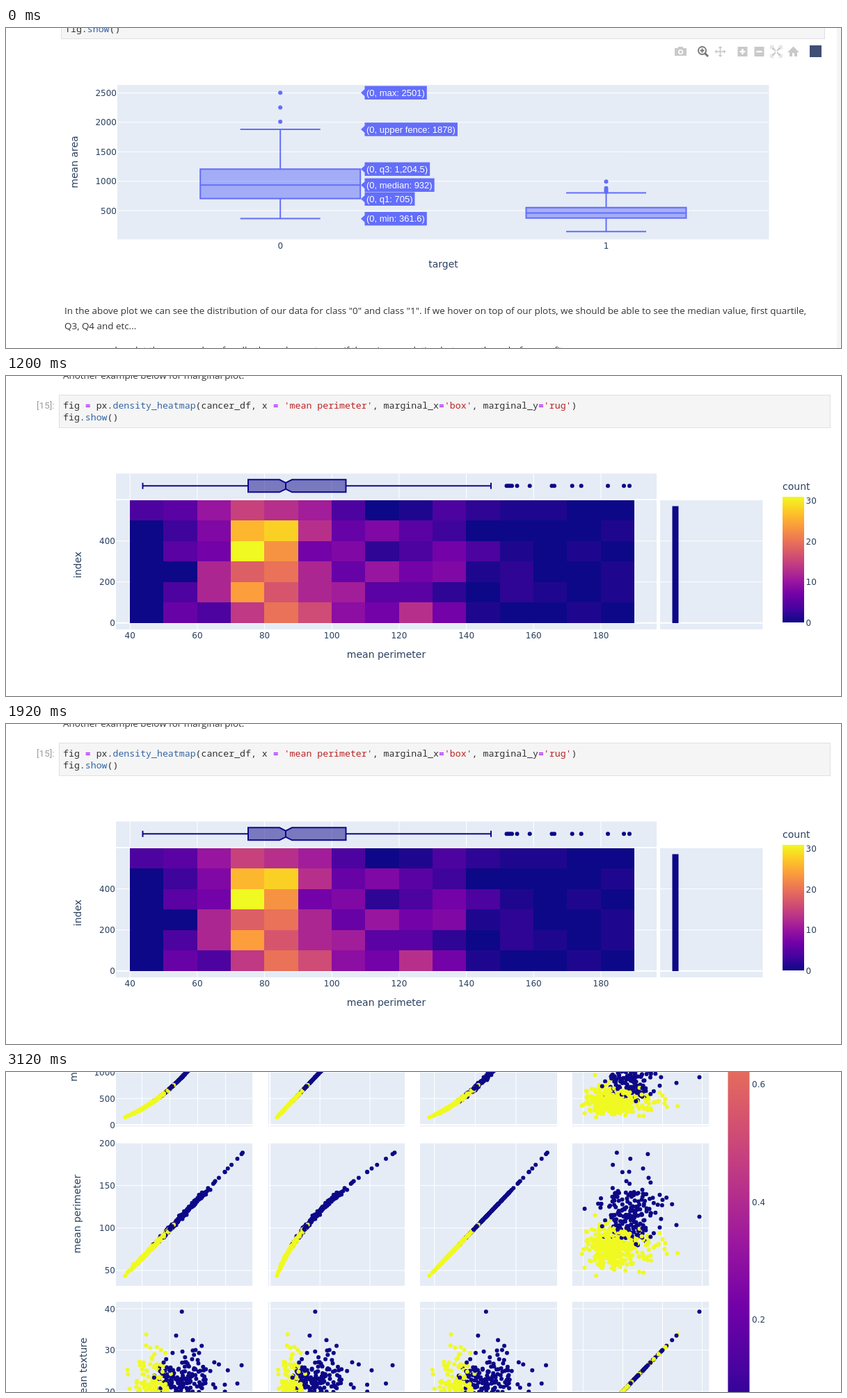
An HTML page with a canvas for the animation above (3600 ms loop, 1200 by 461 pixels).

```html
<!DOCTYPE html>
<html lang="en">
<head>
<meta charset="utf-8">
<title>Notebook charts</title>
<style>
html, body { margin: 0; width: 100%; height: 100%; overflow: hidden; background: #fff; }
canvas { display: block; }
</style>
</head>
<body>
<canvas id="stage" width="1200" height="461"></canvas>
<script>
const ctx = document.getElementById('stage').getContext('2d');
const W = 1200, H = 461, HOLD = 1200;

const INK = '#2a3f5f', PANEL = '#e5ecf6', BLUE = '#636efa', NAVY = '#0d0887', YELLOW = '#f0f921';
const PLASMA = ['#0d0887', '#46039f', '#7201a8', '#9c179e', '#bd3786',
                '#d8576b', '#ed7953', '#fb9f3a', '#fdca26', '#f0f921'];
const TICK = '12px "DejaVu Sans", sans-serif';
const TITLE = '14px "DejaVu Sans", sans-serif';
const HOVER = '13px "Liberation Sans", sans-serif';
const PROSE = '13.43px "Open Sans", sans-serif';
const MONO = '13.24px "Noto Sans Mono", monospace';

// Drawing helpers
function rect(x0, y0, x1, y1, fill) {
  ctx.fillStyle = fill;
  ctx.fillRect(x0, y0, x1 - x0, y1 - y0);
}

function line(x0, y0, x1, y1, color, width = 1) {
  ctx.strokeStyle = color;
  ctx.lineWidth = width;
  ctx.beginPath();
  ctx.moveTo(x0, y0);
  ctx.lineTo(x1, y1);
  ctx.stroke();
}

function dot(x, y, color, r = 3) {
  ctx.fillStyle = color;
  ctx.beginPath();
  ctx.arc(x, y, r, 0, Math.PI * 2);
  ctx.fill();
}

function shape(points, fill) {
  ctx.beginPath();
  points.forEach(([x, y]) => ctx.lineTo(x, y));
  ctx.closePath();
  ctx.fillStyle = fill;
  ctx.fill();
}

function text(str, x, y, font, color = INK, align = 'left') {
  ctx.font = font;
  ctx.fillStyle = color;
  ctx.textAlign = align;
  ctx.fillText(str, x, y);
}

function sideTitle(str, x, y) {
  ctx.save();
  ctx.translate(x, y);
  ctx.rotate(-Math.PI / 2);
  text(str, 0, 0, TITLE, INK, 'center');
  ctx.restore();
}

function code(tokens, x, y) {
  for (const [str, color, bold] of tokens) {
    text(str, x, y, (bold ? 'bold ' : '') + MONO, color);
    x += ctx.measureText(str).width;
  }
}

function cell(x0, y0, x1, y1) {
  rect(x0, y0, x1, y1, '#f5f5f5');
  ctx.strokeStyle = '#e0e0e0';
  ctx.lineWidth = 1;
  ctx.strokeRect(x0 + .5, y0 + .5, x1 - x0 - 1, y1 - y0 - 1);
}

function plasma(t) {
  const p = Math.max(0, Math.min(1, t)) * 9, i = Math.min(8, Math.floor(p));
  const part = (hex, k) => parseInt(hex.substr(1 + 2 * k, 2), 16);
  const mix = k => Math.round(part(PLASMA[i], k) + (part(PLASMA[i + 1], k) - part(PLASMA[i], k)) * (p - i));
  return `rgb(${mix(0)},${mix(1)},${mix(2)})`;
}

function colorBar(x0, x1, top, bottom) {
  const g = ctx.createLinearGradient(0, bottom, 0, top);
  PLASMA.forEach((c, i) => g.addColorStop(i / 9, c));
  rect(x0, top, x1, bottom, g);
}

const CODE = '#303030', CALL = '#3465a4', OP = '#aa22ff', STR = '#ba2121';
const SHOW = [['fig.', CODE], ['show', CALL], ['()', CODE]];

// Scene 1: box plot with hover labels
function modeBar() {
  const pale = '#c9c9c9', dark = '#777', y = 34;
  rect(961, 29, 978, 40, pale);
  rect(966, 27, 973, 30, pale);
  dot(969.5, 34.5, '#fff', 3.6);
  dot(969.5, 34.5, pale, 2);

  line(1004, 36, 1009, 41, dark, 3);
  dot(1000.5, 32.5, dark, 6.5);
  dot(1000.5, 32.5, '#fff', 4.6);
  line(997.5, 32.5, 1003.5, 32.5, dark, 2);
  line(1000.5, 29.5, 1000.5, 35.5, dark, 2);

  line(1019, y, 1034, y, pale, 1.6);
  line(1026.5, 27, 1026.5, 41, pale, 1.6);
  for (let k = 0; k < 4; k++) {
    ctx.save();
    ctx.translate(1026.5, y);
    ctx.rotate(k * Math.PI / 2);
    shape([[8, 0], [5, -3], [5, 3]], pale);
    ctx.restore();
  }

  for (const x of [1058.5, 1082.5]) {
    rect(x - 7, 27, x + 7, 41, pale);
    line(x - 4, y, x + 4, y, '#fff', 2.4);
  }
  line(1058.5, 30, 1058.5, 38, '#fff', 2.4);

  for (const sx of [-1, 1]) for (const sy of [-1, 1]) {
    const at = (a, b) => [1107 + sx * a, y + sy * b];
    line(...at(1, 1), ...at(6, 6), pale, 2);
    shape([at(6, 6), at(6, 2.5), at(2.5, 6)], pale);
    line(...at(8, 3.5), ...at(8, 8), pale, 1);
    line(...at(3.5, 8), ...at(8, 8), pale, 1);
  }

  shape([[1123, 35], [1131.5, 26.5], [1140, 35]], pale);
  rect(1126, 34, 1130, 41, pale);
  rect(1133, 34, 1137, 41, pale);
  rect(1126, 33, 1137, 36, pale);

  rect(1155, 25, 1172, 42, '#3f4f75');
}

function boxPlot(cx, upper, q3, mid, q1, lower, dots) {
  line(cx, upper, cx, q3, BLUE, 2);
  line(cx, q1, cx, lower, BLUE, 2);
  for (const y of [upper, lower]) line(cx - 57.5, y, cx + 57.5, y, BLUE, 2);
  rect(cx - 115, q3, cx + 115, q1, 'rgba(99,110,250,.5)');
  ctx.strokeStyle = BLUE;
  ctx.lineWidth = 2;
  ctx.strokeRect(cx - 115, q3, 230, q1 - q3);
  line(cx - 115, mid, cx + 115, mid, BLUE, 2);
  dots.forEach(y => dot(cx, y, BLUE));
}

function hoverLabel(str, y) {
  ctx.font = HOVER;
  const right = 518 + ctx.measureText(str).width + 3;
  shape([[510, y], [515.5, y - 5], [515.5, y - 9.7], [right, y - 9.7],
         [right, y + 9.7], [515.5, y + 9.7], [515.5, y + 5]], BLUE);
  text(str, 518, y + 4.7, HOVER, '#fff');
}

function boxScene() {
  cell(79, -30, 1177, 16);
  code(SHOW, 85, 6);
  rect(1194, 0, 1200, H, '#f5f5f5');
  modeBar();

  rect(160, 82, 1096.5, 304.5, PANEL);
  for (let v = 500; v <= 2500; v += 500) {
    const y = 305.5 - v * .0848;
    line(160, y, 1096.5, y, '#fff');
    text(v, 159, y + 4.5, TICK, INK, 'right');
  }
  boxPlot(394.2, 146, 203.3, 226.3, 245.7, 274.5, [93.3, 114.5, 135]);
  boxPlot(862.5, 237.5, 258.7, 266.4, 273.8, 293.2, [221.3, 230.7, 233.5, 236]);

  text('0', 394.2, 318, TICK, INK, 'center');
  text('1', 862.5, 318, TICK, INK, 'center');
  text('target', 628.5, 345, TITLE, INK, 'center');
  sideTitle('mean area', 103, 193);

  hoverLabel('(0, max: 2501)', 93.3);
  hoverLabel('(0, upper fence: 1878)', 146);
  hoverLabel('(0, q3: 1,204.5)', 203.3);
  hoverLabel('(0, median: 932)', 226.3);
  hoverLabel('(0, q1: 705)', 246.3);
  hoverLabel('(0, min: 361.6)', 274.7);

  const gray = '#333';
  text('In the above plot we can see the distribution of our data for class "0" and class "1". If we hover on top of our plots, ' +
       'we should be able to see the median value, first quartile,', 84, 412, PROSE, gray);
  text('Q3, Q4 and etc...', 84, 434, PROSE, gray);
  text('so we can also plot the same values for all other columns to see if there is any relation between them, before we fit',
       84, 469, PROSE, gray);
}

// Scene 2: heatmap with marginals
const COUNTS = [
  [4, 5, 10, 15, 13, 11, 4, 0, 1, 4, 2, 1, 1, 0, 0],
  [0, 3, 8, 26, 28, 13, 6, 8, 5, 3, 0, 0, 0, 0, 1],
  [0, 5, 7, 31, 23, 7, 8, 2, 4, 7, 4, 1, 0, 1, 0],
  [0, 0, 12, 18, 20, 12, 6, 10, 7, 8, 1, 2, 0, 0, 1],
  [0, 4, 12, 24, 17, 12, 11, 5, 5, 2, 0, 2, 1, 0, 1],
  [0, 6, 4, 14, 20, 16, 9, 7, 13, 7, 1, 0, 0, 1, 0]
];
const FAR = [719.5, 722, 724.5, 727, 734.5, 752.7, 784.5, 788, 813.7, 826.7, 865, 888, 896];

function heatScene() {
  text('Another example below for marginal plot.', 82, 4, PROSE, '#333');
  cell(76, 27, 1185, 75);
  text('[15]:', 44, 47, '13.5px Roboto, sans-serif', '#9e9e9e');
  code([
    ['fig ', CODE], ['=', OP, true], [' px.', CODE], ['density_heatmap', CALL],
    ['(cancer_df, x ', CODE], ['=', OP, true], [" 'mean perimeter'", STR],
    [', marginal_x', CODE], ['=', OP, true], ["'box'", STR],
    [', marginal_y', CODE], ['=', OP, true], ["'rug'", STR], [')', CODE]
  ], 82, 47);
  code(SHOW, 82, 64);

  rect(158, 140.5, 935, 177, PANEL);
  rect(158, 179, 935, 365, PANEL);
  rect(940, 179, 1087.5, 365, PANEL);
  for (let v = 40; v <= 180; v += 20) {
    const x = 178.2 + (v - 40) * 4.834;
    line(x, 140.5, x, 365, '#fff');
    text(v, x, 378, TICK, INK, 'center');
  }
  for (const v of [0, 200, 400]) {
    const y = 355.8 - v * .2955, w = v ? 1 : 2;
    line(158, y, 935, y, '#fff', w);
    line(940, y, 1087.5, y, '#fff', w);
    text(v, 157, y + 4.5, TICK, INK, 'right');
  }

  const edgeX = i => Math.round(178 + i * 48.33), edgeY = i => Math.round(178.5 + i * 29.5);
  COUNTS.forEach((row, j) => row.forEach((n, i) =>
    rect(edgeX(i), edgeY(j), edgeX(i + 1), edgeY(j + 1), plasma(n / 31))));

  const y = 158.3;
  line(196.5, y, 348, y, NAVY, 2);
  line(488.5, y, 697, y, NAVY, 2);
  for (const x of [196.5, 697]) line(x, y - 4.5, x, y + 4.5, NAVY, 2);
  shape([[348, y - 9], [393, y - 9], [402, y - 4.5], [411, y - 9], [488.5, y - 9],
         [488.5, y + 9], [411, y + 9], [402, y + 4.5], [393, y + 9], [348, y + 9]], 'rgba(13,8,135,.5)');
  ctx.strokeStyle = NAVY;
  ctx.lineWidth = 2;
  ctx.stroke();
  line(402, y - 4.5, 402, y + 4.5, NAVY, 2);
  FAR.forEach(x => dot(x, y, NAVY));

  rect(957.5, 187.5, 966.5, 356, NAVY);
  text('mean perimeter', 546.5, 406, TITLE, INK, 'center');
  sideTitle('index', 107.5, 272);

  text('count', 1116, 164, TITLE);
  colorBar(1116, 1147, 174, 355);
  for (let v = 0; v <= 30; v += 10) text(v, 1149.5, 359.5 - v * 5.84, TICK);
}

// Scene 3: scatter matrix from seeded samples
let seed = 20;
function rnd() {
  seed = (seed + 0x6d2b79f5) | 0;
  let t = Math.imul(seed ^ (seed >>> 15), 1 | seed);
  t = (t + Math.imul(t ^ (t >>> 7), 61 | t)) ^ t;
  return ((t ^ (t >>> 14)) >>> 0) / 4294967296;
}
const gauss = () => Math.sqrt(-2 * Math.log(1 - rnd())) * Math.cos(2 * Math.PI * rnd());

function within(draw, lo, hi) {
  let v;
  do v = draw(); while (v < lo || v > hi);
  return v;
}

// Outlying samples as [perimeter, texture]
const DARK_EDGE = [
  [188.5, 18.5], [186.9, 26.3], [181.5, 21.9], [174.2, 17.5], [170, 25.1], [165.7, 19.9], [166.2, 21.6],
  [158.9, 26.5], [155.1, 20.9], [153.4, 27], [152.1, 21.7], [139, 29.3], [135.7, 31], [133, 30], [128, 32.4],
  [113.3, 39.28], [103.5, 33.5], [100.6, 29.3], [122.6, 10.4], [134.9, 14.5], [128.5, 13.8], [102, 14.8]
];
const LIGHT_EDGE = [
  [70.4, 33.8], [86.7, 30], [82.3, 30.7], [94, 29.3], [69.6, 31.1], [75.3, 30.5], [81.5, 29],
  [43.8, 13.3], [69.6, 9.71], [53.3, 10.4], [47.5, 25.2], [48.4, 24.1], [75, 10.2], [115, 13]
];

function sample(p, t, color) {
  const dark = color === NAVY;
  const r = (p + 4) / 6.85 + gauss() * (p > 150 || p < 48 ? .05 : dark ? .24 : .12);
  const a = r * r * (2.92 + .009 * r) + gauss() * 5;
  return { r, a, p, t, color, order: rnd() };
}

const samples = [
  ...DARK_EDGE.map(([p, t]) => sample(p, t, NAVY)),
  ...LIGHT_EDGE.map(([p, t]) => sample(p, t, YELLOW))
];
for (let i = 0; i < 190; i++) {
  samples.push(sample(within(() => 113 + gauss() * 18, 73, 147), within(() => 21.5 + gauss() * 3.4, 14, 30), NAVY));
}
for (let i = 0; i < 343; i++) {
  samples.push(sample(within(() => 78 + gauss() * 11.5, 50, 110),
                      within(() => Math.exp(2.86 + gauss() * .215), 10.7, 29), YELLOW));
}
samples.sort((m, n) => m.order - n.order);

// Each axis maps value v to base + v * unit
const COLS = [
  { key: 'r', x0: 158, x1: 354.5, base: 115, unit: 8.025, marks: [10, 15, 20, 25] },
  { key: 'a', x0: 376.5, x1: 573, base: 379.2, unit: .0719, marks: [0, 1000, 2000] },
  { key: 'p', x0: 595, x1: 792, base: 557.2, unit: 1.171, marks: [50, 100, 150] },
  { key: 't', x0: 813.5, x1: 1010.5, base: 772.2, unit: 5.71, marks: [10, 20, 30, 40] }
];
const ROWS = [
  { key: 'a', y0: -10, y1: 78.5, base: 76, unit: -.0756, marks: [0, 500, 1000] },
  { key: 'p', y0: 102, y1: 308, base: 347.2, unit: -1.2247, marks: [50, 100, 150, 200] },
  { key: 't', y0: 331, y1: 480, base: 579, unit: -5.95, marks: [20, 30, 40] }
];
const place = (axis, v) => axis.base + v * axis.unit;

function scatter(col, row) {
  ctx.save();
  ctx.beginPath();
  ctx.rect(col.x0, row.y0, col.x1 - col.x0, row.y1 - row.y0);
  ctx.clip();
  rect(col.x0, row.y0, col.x1, row.y1, PANEL);
  for (const v of col.marks) {
    const x = place(col, v);
    line(x, row.y0, x, row.y1, '#fff', v ? 1 : 2);
  }
  for (const v of row.marks) {
    const y = place(row, v);
    line(col.x0, y, col.x1, y, '#fff', v ? 1 : 2);
  }
  for (const s of samples) dot(place(col, s[col.key]), place(row, s[row.key]), s.color);
  ctx.restore();
}

function matrixScene() {
  for (const row of ROWS) {
    for (const col of COLS) scatter(col, row);
    for (const v of row.marks) text(v, 157, place(row, v) + 4.5, TICK, INK, 'right');
  }
  sideTitle('mean area', 102, -24);
  sideTitle('mean perimeter', 107, 204.5);
  sideTitle('mean texture', 115.5, 430);

  colorBar(1037.5, 1068.5, -320, 526);
  for (const v of [.2, .4, .6]) text(v, 1072, 530 - v * 846, TICK);
}

// Playback
const SCENES = [boxScene, heatScene, matrixScene];
let shown = -1;

function tick() {
  const i = Math.floor(performance.now() / HOLD) % SCENES.length;
  if (i !== shown) {
    shown = i;
    rect(0, 0, W, H, '#fff');
    SCENES[i]();
  }
  requestAnimationFrame(tick);
}
tick();
</script>
</body>
</html>
```
